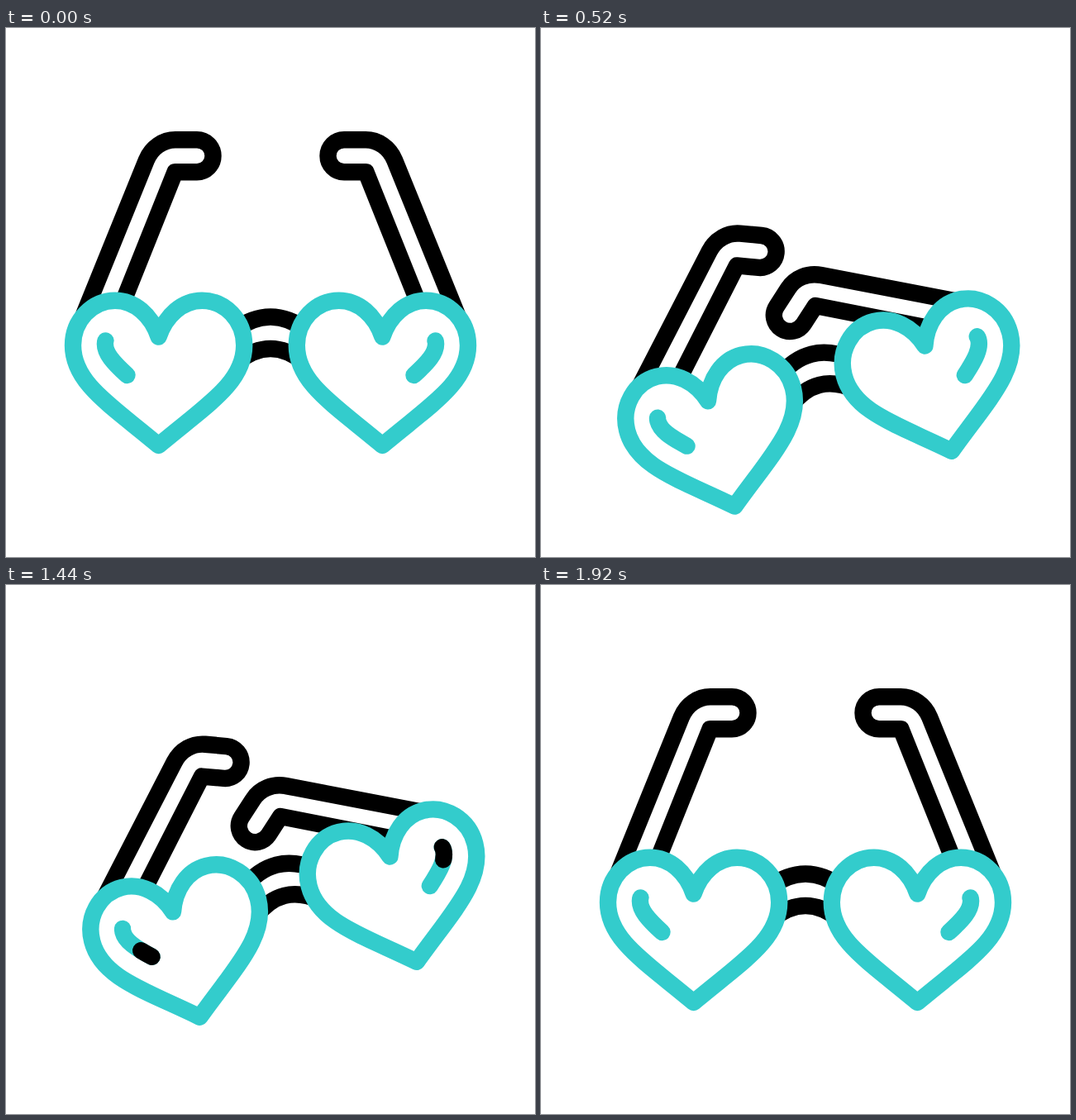
Animation, 640 px wide and 640 px high, one loop 2 s. Source, as an HTML page:

```html
<!DOCTYPE html>
<html lang="en">
<head>
<meta charset="utf-8">
<title>Heart glasses</title>
<style>
  html, body { margin: 0; width: 100%; height: 100%; overflow: hidden; background: #fff; }
  svg { display: block; width: 100vw; height: 100vh; }
  path { fill: none; stroke: #000; stroke-width: 20.4; stroke-linecap: round; stroke-linejoin: round; }
  .lens path { stroke: #33cccc; }
  .lens .rim { fill: #fff; }
  .lens .gleam { stroke: #000; }
</style>
</head>
<body>
<svg viewBox="0 0 640 640">
  <defs>
    <path id="arm" d="M92 352 L169.8 160 C176 144.500 190 135.200 205 135.200 H231 A19.500 19.500 0 0 1 231 174.200 H204.500 L139 338"/>
    <path id="rim" class="rim" d="M184.600 373.600 C176 347.600 155.500 329.700 132 329.700 C104 329.700 81 354 81 384 C81 430 128 457 184.600 505 C241.200 457 288.200 430 288.200 384 C288.200 354 265.200 329.700 237.200 329.700 C213.700 329.700 193.200 347.600 184.600 373.600 Z"/>
    <path id="shine" d="M120.500 378.400 C120 379.700 119.900 380.900 119.900 382.200 C119.900 393.500 129 404 146.500 420"/>
  </defs>
  <g id="glasses"></g>
</svg>
<script>
const LOOP = 2000, STEP = 40;
const TILT = -14.3, DROP = 46, LIFT = -10;
const LENS_CENTER = [184.6, 413];
const glasses = document.getElementById('glasses');
const shapeOf = id => document.getElementById(id).getAttribute('d');

// The right side is the left one mirrored.
const sideMarkup = content =>
  `<g>${content}</g><g transform="translate(640) scale(-1 1)">${content}</g>`;

glasses.innerHTML =
  sideMarkup(`<path class="arm" d="${shapeOf('arm')}"/>`) +
  `<path d="M275 366.5 Q320 332.5 365 366.5"/>
   <path d="M280 404 Q320 372 360 404"/>` +
  sideMarkup(`<g class="lens">
    <path class="rim" d="${shapeOf('rim')}"/>
    <path d="${shapeOf('shine')}"/>
    <path class="gleam" pathLength="100" d="${shapeOf('shine')}"/>
  </g>`);

const arms = glasses.querySelectorAll('.arm');
const lenses = glasses.querySelectorAll('.lens');
const gleams = glasses.querySelectorAll('.gleam');

const sides = [
  { hinge: [88.4, 357], fold: 19.5, pulseStart: 520, backwards: true },
  { hinge: [100, 357], fold: 42.8, pulseStart: 760, backwards: false }
];

function ease(t, from, to) {
  const p = Math.min(1, Math.max(0, (t - from) / (to - from)));
  return p * p * (3 - 2 * p);
}

function pulse(t, start) {
  const beat = 190, at = n => ease(t, start + n * beat, start + (n + 1) * beat);
  return 1 - 0.05 * at(0) + 0.105 * at(1) - 0.055 * at(2);
}

function drawGleam(path, head, tail, backwards) {
  const length = 100 * (head - tail);
  const start = 100 * (backwards ? 1 - head : tail);
  path.style.display = length > 0 ? '' : 'none';
  path.setAttribute('stroke-dasharray', `${length} 300`);
  path.setAttribute('stroke-dashoffset', -start);
}

function draw(t) {
  const back = 1 - ease(t, 1638, 1920);
  const lean = ease(t, 80, 530);
  const rise = ease(t, 530, 670);
  const shift = (DROP * lean + (LIFT - DROP) * rise) * back;
  glasses.setAttribute('transform',
    `translate(0 ${shift}) rotate(${TILT * lean * back} 320 320)`);

  const fold = ease(t, 80, 438) - ease(t, 1487, 1847);
  const head = ease(t, 1295, 1695), tail = ease(t, 1505, 1905);
  const [cx, cy] = LENS_CENTER;
  sides.forEach((side, i) => {
    arms[i].setAttribute('transform', `rotate(${side.fold * fold} ${side.hinge})`);
    lenses[i].setAttribute('transform',
      `translate(${cx} ${cy}) scale(${pulse(t, side.pulseStart)}) translate(${-cx} ${-cy})`);
    drawGleam(gleams[i], head, tail, side.backwards);
  });
}

const origin = performance.now();
function tick() {
  const t = (performance.now() - origin) % LOOP;
  draw(Math.floor(t / STEP) * STEP);
  requestAnimationFrame(tick);
}
draw(0);
requestAnimationFrame(tick);
</script>
</body>
</html>
```
